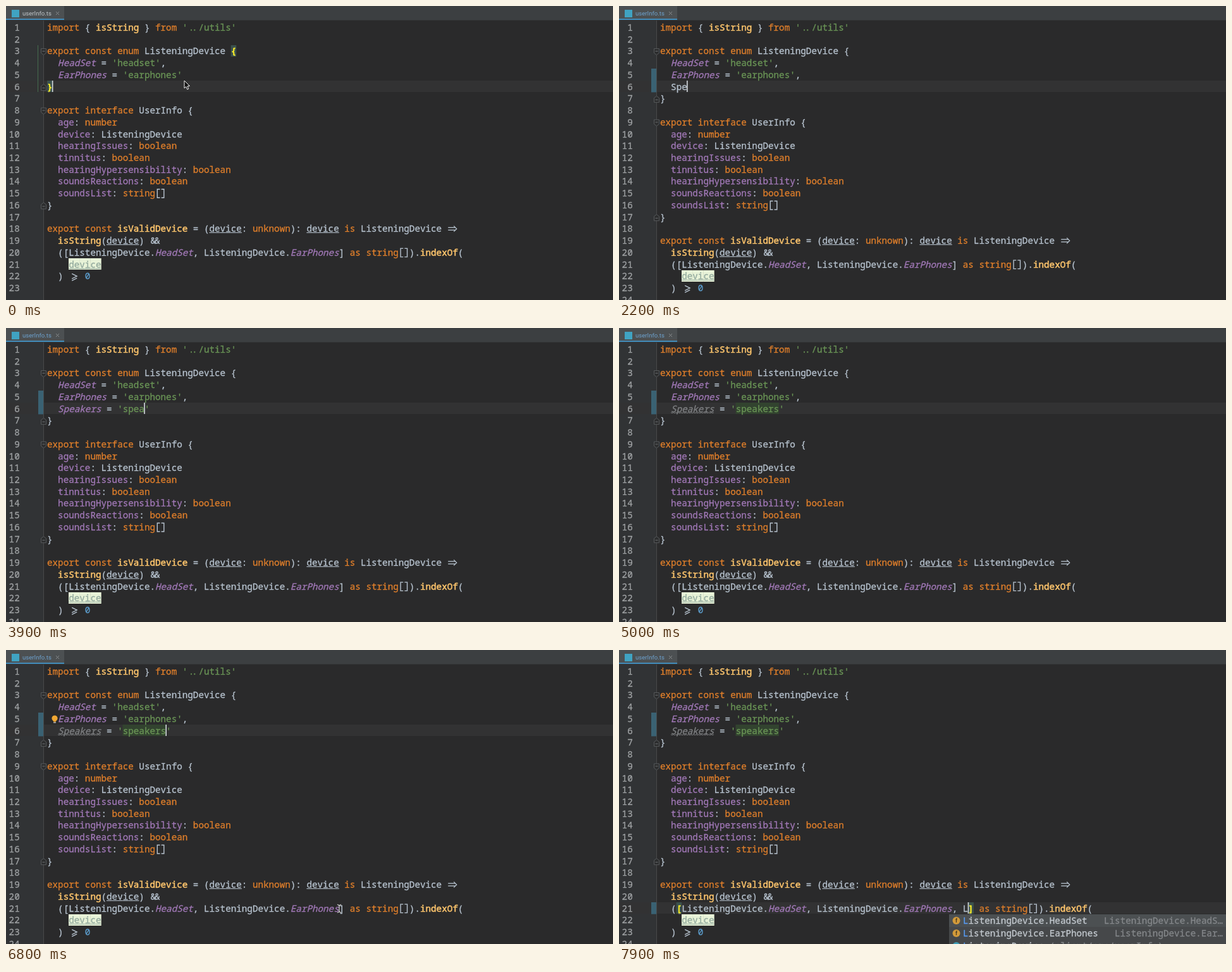
An HTML page with a canvas for the animation above (8000 ms loop, 960 by 465 pixels).

```html
<!DOCTYPE html>
<html lang="en">
<head>
<meta charset="utf-8">
<title>Editor</title>
<style>
html, body { margin: 0; width: 100%; height: 100%; overflow: hidden; background: #2a2a2b; }
canvas { display: block; }
</style>
</head>
<body>
<canvas id="stage" width="960" height="465"></canvas>
<script>
const ctx = document.getElementById('stage').getContext('2d');
const LOOP = 8000, STEP = 100;
const X0 = 65, CELL = 8.55, Y0 = 34, ROW = 18.73;
const FACE = '14.25px "Noto Sans Mono", "DejaVu Sans Mono", monospace';
const COLORS = {
  t: '#b8c4d0', u: '#b8c4d0', k: '#e07f2b', p: '#a279b8', i: '#a279b8', s: '#6a9556',
  f: '#ffc66d', n: '#5d9fcf', d: '#93aa9e', g: '#7f8083'
};

// ~x switches the style; the wide signs take two cells.
const HEAD = [
  "~kimport ~t{ ~fisString ~t} ~kfrom ~s'‥/utils'",
  "",
  "~kexport const enum ~tListeningDevice {",
  "  ~iHeadSet~t = ~s'headset'~t,"
];
const TAIL = [
  "}",
  "",
  "~kexport interface ~tUserInfo {",
  "  ~page~t: ~knumber",
  "  ~pdevice~t: ListeningDevice",
  "  ~phearingIssues~t: ~kboolean",
  "  ~ptinnitus~t: ~kboolean",
  "  ~phearingHypersensibility~t: ~kboolean",
  "  ~psoundsReactions~t: ~kboolean",
  "  ~psoundsList~t: ~kstring~t□",
  "}",
  "",
  "~kexport const ~fisValidDevice~t = (~udevice~t: ~kunknown~t): ~udevice~t ~kis~t ListeningDevice ⇒",
  "  ~fisString~t(~udevice~t) ＆"
];

const TIMES = {
  click: 700, comma: 1300, dirty: 1400, newline: 1700, mark: 2000, member: 2700,
  unused: 5000, bulb: 5200, move: 5500, click2: 7000, popup: 7900
};
const KEYS = [2000, 2100, 2200, 2400, 2500, 2600, 2800, 2900, 3100, 3200, 3400, 3500,
  3600, 3700, 3800, 3900, 4100, 4200, 4300, 4500];
const KEYS2 = [7500, 7600, 7800];

const colX = c => X0 + c * CELL;
const rowY = r => Y0 + (r - 1) * ROW;
const rowTop = r => Math.round(rowY(r) - 9.6);
const typed = (keys, t) => keys.filter(k => t >= k).length;

function rect(x, y, w, h, color) {
  ctx.fillStyle = color;
  ctx.fillRect(x, y, w, h);
}

function path(points, color, width = 1, fill) {
  ctx.beginPath();
  points.forEach(([x, y], i) => i ? ctx.lineTo(x, y) : ctx.moveTo(x, y));
  if (fill) {
    ctx.closePath();
    ctx.fillStyle = fill;
    ctx.fill();
  }
  ctx.strokeStyle = color;
  ctx.lineWidth = width;
  ctx.stroke();
}

function disc(x, y, r, color) {
  ctx.beginPath();
  ctx.arc(x, y, r, 0, Math.PI * 2);
  ctx.fillStyle = color;
  ctx.fill();
}

// A hairline around each letter gives the medium weight of the editor font.
function mono(text, x, y, color, { style = '', heft = .3 } = {}) {
  ctx.font = style + ' ' + FACE;
  ctx.fillStyle = ctx.strokeStyle = color;
  ctx.lineWidth = heft;
  [...text].forEach((ch, i) => {
    if (ch === ' ') return;
    ctx.fillText(ch, x + i * CELL, y + 5);
    ctx.strokeText(ch, x + i * CELL, y + 5);
  });
}

const WIDE = {
  '⇒'(x, y, c) {
    path([[x + 1.5, y - 2], [x + 13, y - 2]], c, 1.3);
    path([[x + 1.5, y + 2], [x + 13, y + 2]], c, 1.3);
    path([[x + 10.5, y - 4.5], [x + 15, y], [x + 10.5, y + 4.5]], c, 1.3);
  },
  '≥'(x, y, c) {
    path([[x + 5, y - 4], [x + 13, y], [x + 5, y + 4]], c, 1.3);
    path([[x + 5, y + 7], [x + 13, y + 3]], c, 1.3);
  },
  '□'(x, y, c) {
    path([[x + 7.5, y - 6.5], [x + 3.3, y - 6.5], [x + 3.3, y + 7], [x + 7.5, y + 7]], c, 1.4);
    path([[x + 9.6, y - 6.5], [x + 13.8, y - 6.5], [x + 13.8, y + 7], [x + 9.6, y + 7]], c, 1.4);
  },
  '‥'(x, y, c) {
    mono('.', x + 1.5, y, c);
    mono('.', x + 6.8, y, c);
  },
  '＆'(x, y, c) {
    mono('&', x + 1, y, c);
    mono('&', x + 7.5, y, c);
  }
};

function codeLine(line, r) {
  const y = rowY(r);
  let col = 0, style = 't';
  const chars = [...line];
  for (let i = 0; i < chars.length; i++) {
    const ch = chars[i];
    if (ch === '~') { style = chars[++i]; continue; }
    const x = colX(col), color = COLORS[style];
    if (WIDE[ch]) {
      WIDE[ch](x, y, color);
      col += 2;
      continue;
    }
    if (style === 'd') rect(x - .2, rowTop(r), CELL + .4, 18, '#e8f3d8');
    mono(ch, x, y, color, {
      style: style === 'i' || style === 'g' ? 'italic' : '',
      heft: style === 'f' ? .5 : .3
    });
    if (style === 'u' || style === 'd') rect(x, Math.round(y + 6), CELL + .1, 1, color);
    col++;
  }
}

function bracket(ch, col, r) {
  rect(colX(col), rowTop(r), CELL, 18, '#3b514d');
  mono(ch, colX(col), rowY(r), '#ffef28', { style: 'bold' });
}

function fold(r, up) {
  const x = 59.5, y = rowY(r) + 1, s = up ? -1 : 1;
  path([[x - 4, y - 5 * s], [x + 4, y - 5 * s], [x + 4, y + 2 * s], [x, y + 5 * s],
    [x - 4, y + 2 * s], [x - 4, y - 5 * s]], '#56595b', 1, '#2d2e2f');
  path([[x - 2, y - s], [x + 2, y - s]], '#6c6f71');
}

function tabBar(dirty) {
  rect(0, 0, 960, 23, '#3c3f41');
  rect(0, 0, 92, 23, '#4c5052');
  rect(0, 20, 92, 2, '#428cba');
  rect(0, 22, 960, 1, '#333536');
  rect(9, 6, 12, 12, '#40a3c2');
  ctx.font = '9.6px Roboto, "Liberation Sans", sans-serif';
  ctx.fillStyle = dirty ? '#6da2cf' : '#c0c6ca';
  ctx.fillText('userInfo.ts', 26, 15.2);
  path([[79, 9], [84, 14]], '#85898b');
  path([[84, 9], [79, 14]], '#85898b');
}

function bulb() {
  disc(77, 108, 4.6, '#f0a732');
  rect(75, 111.5, 4, 2, '#f0a732');
  rect(75, 114, 4, 1.5, '#b5b5b5');
}

function squiggle(from, to, y) {
  const pts = [];
  for (let x = from; x <= to; x += 2) pts.push([x, y + (x - from) % 4 / 2]);
  path(pts, '#8b8c8f', .8);
}

function popup() {
  rect(522, 418, 438, 47, '#46484a');
  rect(522, 418, 438, 20, '#4c5052');
  const rows = [['HeadSet', 'HeadS…', 767], ['EarPhones', 'Ear…', 784]];
  rows.forEach(([name, hint, x], i) => {
    const y = 428 + i * 20;
    disc(533.5, y, 6, '#d29a3a');
    ctx.font = 'bold 9px "Liberation Sans", sans-serif';
    ctx.fillStyle = '#4a3b20';
    ctx.fillText('f', 532, y + 3);
    mono('L', 544, y, '#589df6');
    mono('isteningDevice.' + name, 544 + CELL, y, '#c4cad0');
    mono('ListeningDevice.' + hint, x, y, '#85888b');
  });
  disc(533.5, 468, 6, '#3f9db5');
  mono('L', 544, 468, '#589df6');
  mono('isteningDevice', 544 + CELL, 468, '#c4cad0');
  mono('(client/src/userInfo)', 681, 468, '#85888b');
}

function arrow(x, y) {
  path([[x, y], [x, y + 12], [x + 2.8, y + 9.6], [x + 4.8, y + 14], [x + 6.8, y + 13],
    [x + 4.9, y + 8.8], [x + 8.5, y + 8.5], [x, y]], '#f2f2f2', 1, '#111');
}

function ibeam(x, y) {
  const c = '#d8d8d8';
  path([[x, y - 5], [x, y + 5]], c, 1.2);
  path([[x - 3, y - 6.5], [x, y - 5], [x + 3, y - 6.5]], c, 1.2);
  path([[x - 3, y + 6.5], [x, y + 5], [x + 3, y + 6.5]], c, 1.2);
}

function along(t, stops) {
  for (let i = 1; i < stops.length; i++) {
    const [t0, x0, y0] = stops[i - 1], [t1, x1, y1] = stops[i];
    if (t > t1) continue;
    const p = Math.max(0, (t - t0) / (t1 - t0)), e = p * p * (3 - 2 * p);
    return [x0 + (x1 - x0) * e, y0 + (y1 - y0) * e];
  }
  return stops[stops.length - 1].slice(1);
}

function pointer(t) {
  if (t < 200) arrow(282, 118);
  else if (t < TIMES.comma) ibeam(...along(t, [[200, 284, 119], [600, 292, 110]]));
  else if (t >= TIMES.move && t < 7200)
    ibeam(...along(t, [[5500, 292, 110], [6000, 340, 301], [6800, 527, 409]]));
}

function newMember(t) {
  const n = typed(KEYS, t);
  const name = 'Speakers'.slice(0, n);
  const style = t >= TIMES.unused ? 'g' : t >= TIMES.member ? 'i' : 't';
  let line = '  ~' + style + name + '~t' + ' = '.slice(0, Math.max(0, n - 8));
  if (n > 11) line += "~s'" + 'speakers'.slice(0, n - 12) + "'";
  return { line, col: 2 + n };
}

function caretAt(t, member) {
  if (t < TIMES.click) return [1, 6, 0];
  if (t < TIMES.comma) return [25, 5, TIMES.click];
  if (t < TIMES.newline) return [26, 5, TIMES.comma];
  if (t < TIMES.click2) return [member.col, 6, 4500];
  return [54 + typed(KEYS2, t), 21, TIMES.click2 + 200];
}

function draw(t) {
  const extra = t >= TIMES.newline ? 1 : 0;
  const member = newMember(t);
  const extraArg = ', L'.slice(0, typed(KEYS2, t));
  const lines = HEAD.concat(
    "  ~iEarPhones~t = ~s'earphones'~t" + (t >= TIMES.comma ? ',' : ''),
    extra ? member.line : [],
    TAIL,
    '  ([ListeningDevice.~iHeadSet~t, ListeningDevice.~iEarPhones~t' + extraArg +
      '] ~kas string~t□).~findexOf~t(',
    '    ~ddevice',
    '  ) ≥ ~n0',
    ''
  );
  const [col, row, since] = caretAt(t, member);

  rect(0, 0, 960, 465, '#2a2a2b');
  rect(0, 23, 59, 442, '#313335');
  rect(0, rowTop(row), 960, 18, '#323233');
  rect(59, 23, 1, 442, '#48494a');
  tabBar(t >= TIMES.dirty);

  if (t >= TIMES.mark) rect(51, rowTop(5), 8, ROW * 2, '#3a6273');
  if (t >= KEYS2[0]) rect(51, rowTop(21), 8, ROW, '#3a6273');
  if (row === 6 && !extra) rect(50, 62, 1, 74, '#456b4e');

  if (t >= TIMES.unused) {
    rect(184.5, rowTop(6), CELL * 8, 18, '#32432f');
    squiggle(82, 150, rowY(6) + 6);
  }

  lines.forEach((line, i) => {
    const num = String(i + 1);
    mono(num, 21.7 - num.length * CELL, rowY(i + 1), '#a0a3a5');
    codeLine(line, i + 1);
  });

  fold(3, false);
  fold(6 + extra, true);
  fold(8 + extra, false);
  fold(16 + extra, true);

  if (row === 6 && !extra) {
    bracket('{', 34, 3);
    bracket('}', 0, 6);
  }
  if (row === 21) {
    bracket('[', 3, 21);
    bracket(']', col, 21);
  }
  if (t >= TIMES.bulb && t < TIMES.click2) bulb();

  const typing = t >= TIMES.newline && t <= 4500 || t >= KEYS2[0];
  if (typing || Math.floor((t - since) / 500) % 2 === 0)
    rect(colX(col) - .7, rowTop(row), 1.6, 18, '#d5dbe0');

  if (t >= TIMES.popup) popup();
  pointer(t);
}

function tick(now) {
  const t = now % LOOP;
  draw(Math.floor(t / STEP) * STEP);
  requestAnimationFrame(tick);
}
requestAnimationFrame(tick);
</script>
</body>
</html>
```
